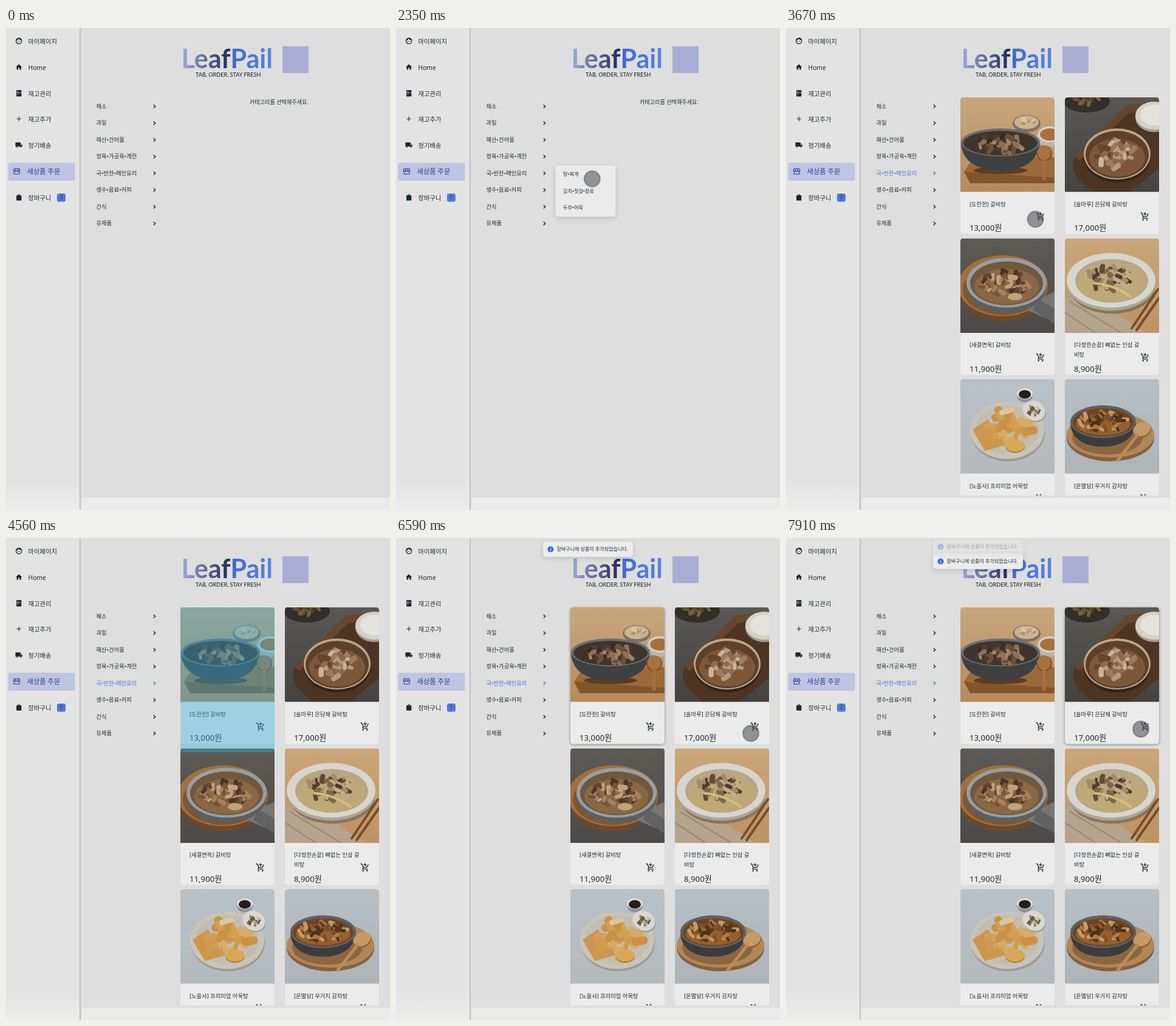
An HTML page for the animation above (8 s loop, 632 by 792 pixels).

```html
<!DOCTYPE html>
<html>
<head>
<meta charset="utf-8">
<title>LeafPail</title>
<style>
  html, body { margin: 0; width: 100%; height: 100%; overflow: hidden; background: #dedede; }
  svg { display: block; width: 100%; height: 100%; }
  text { font-family: "Noto Sans", "Noto Sans CJK KR", "Noto Sans CJK", sans-serif; font-weight: 500; fill: #222b30; white-space: pre; }
  .logo { font-family: Lato, sans-serif; }
  .soft { filter: drop-shadow(0 2px 4px rgba(0,0,0,.16)); }
  .lift { filter: drop-shadow(0 1px 2px rgba(0,0,0,.4)); }
</style>
</head>
<body>
<svg id="stage" viewBox="0 0 632 792"></svg>
<script>
const DARK = '#1c262b', BLUE = '#4d7bd8', NAVY = '#2c3c94';
const LOOP = 8000;

// Text centred vertically on y
const label = (s, x, y, size, extra = '') =>
  `<text x="${x}" y="${y + size * 0.36}" font-size="${size}" ${extra}>${s}</text>`;
const oval = (x, y, rx, ry, fill, extra = '') =>
  `<ellipse cx="${x}" cy="${y}" rx="${rx}" ry="${ry}" fill="${fill}" ${extra}/>`;
const box = (x, y, w, h, fill, r = 0, extra = '') =>
  `<rect x="${x}" y="${y}" width="${w}" height="${h}" rx="${r}" fill="${fill}" ${extra}/>`;
const shape = (d, fill, extra = '') => `<path d="${d}" fill="${fill}" ${extra}/>`;
const stroke = (d, color, w) =>
  `<path d="${d}" fill="none" stroke="${color}" stroke-width="${w}" stroke-linecap="round" stroke-linejoin="round"/>`;
const gradient = (id, a, b, attrs = 'x2="0" y2="1"') =>
  `<linearGradient id="${id}" ${attrs}><stop stop-color="${a}"/><stop offset="1" stop-color="${b}"/></linearGradient>`;

let seed = 7;
const rand = () => (seed = (seed * 16807) % 2147483647) / 2147483647;

// Chunks of food scattered inside an ellipse
function chunks(cx, cy, rx, ry, n, size, colors) {
  let out = '';
  for (let i = 0; i < n; i++) {
    const a = rand() * 6.283, d = Math.sqrt(rand()), s = size * (0.6 + rand() * 0.6);
    const x = cx + Math.cos(a) * d * rx, y = cy + Math.sin(a) * d * ry;
    out += box(-s, -s * 0.5, s * 2, s, colors[i % colors.length], s * 0.45,
      `transform="translate(${x.toFixed(1)} ${y.toFixed(1)}) rotate(${(rand() * 180 - 90).toFixed()})"`);
  }
  return out;
}

const MEAT = ['#3b2a20', '#6d4f3a', '#8f7159', '#543b2b', '#a08569'];
const GOLD = ['#d2a055', '#c99246', '#d9aa62', '#cf9a4e'];
const photos = [
  ['#c8a67d', '#b78a5c',
    shape('M6 122L22 98H155V141H16Z', '#9b6a3a') + shape('M6 122L155 132V141H16Z', '#83552c') +
    oval(109, 43, 23, 14, '#7d7062') + oval(109, 41, 20, 11, '#c9b492') +
    chunks(109, 41, 13, 6, 14, 4, ['#b68f60', '#dfc9a8', '#cbb088']) +
    oval(147, 64, 22, 17, '#b9b6b0') + oval(147, 61, 19, 13, '#d5d2cb') + oval(147, 61, 16, 10, '#a8713c') +
    oval(66, 120, 44, 6, '#5c3c22') +
    shape('M1 74C2 104 26 120 66 120S128 104 131 74Z', '#3d4144') +
    oval(66, 74, 65, 23, '#6b6d6d') + oval(66, 75, 61, 20, '#3d352e') +
    chunks(64, 78, 42, 14, 44, 7, MEAT) +
    oval(138, 92, 13, 13, '#7d4f28') + oval(138, 91, 11, 12, '#a87140') + stroke('M138 102V134', '#a5703f', 5)],
  ['#5a5854', '#444340',
    shape('M155 6L100 14L16 98Q8 116 22 134L44 155H108L155 116Z', '#4d3524') +
    shape('M155 6L100 14L16 98L24 104L104 26L155 18Z', '#67462d') +
    oval(36, 6, 38, 19, '#302f2c') + chunks(36, 5, 27, 12, 28, 5, ['#665530', '#45422a', '#806236', '#332d20']) +
    oval(147, 33, 31, 24, '#a09d96') + oval(147, 30, 31, 23, '#d5d1c9') + oval(148, 29, 24, 17, '#e4e2dc') +
    oval(86, 98, 55, 42, '#33241b') + oval(86, 93, 55, 42, '#bda585') +
    oval(86, 94, 52, 39, '#5b412d') + oval(86, 99, 46, 31, '#7d5838') +
    chunks(84, 94, 31, 22, 40, 8, ['#b39a82', '#8b6a50', '#c9b49b', '#634530', '#9c7b5e'])],
  ['#5d5a56', '#4c4a48',
    oval(70, 83, 75, 53, '#6f482b') + oval(70, 78, 74, 50, '#a0703f') +
    oval(70, 84, 66, 42, '#805630') +
    shape('M118 104L155 88V128L140 131L110 118Z', '#777675') +
    shape('M128 100L155 116V140L120 118Z', '#626162') +
    oval(76, 80, 66, 42, '#5a5f63') + oval(76, 73, 66, 41, '#999d9f') +
    oval(76, 74, 60, 36, '#6f5840') + oval(76, 79, 53, 29, '#8a6843') +
    chunks(74, 75, 40, 22, 46, 7, ['#4c3524', '#75543a', '#a3815d', '#bfa27b', '#62452f']) +
    oval(90, 96, 12, 6, '#bda57e')],
  ['#cba67a', '#bd9263',
    shape('M0 96L55 104L132 155H0Z', '#b5a48c') + stroke('M8 104L92 155M0 122L50 155', '#968670', 2) +
    oval(78, 82, 70, 42, '#8c7457') + oval(76, 74, 73, 45, '#aaa59b') + oval(76, 69, 73, 45, '#d8d5cd') +
    oval(77, 70, 60, 36, '#b8a684') + oval(77, 74, 55, 30, '#bda878') +
    chunks(74, 64, 38, 20, 40, 7, ['#5f4a37', '#7e664c', '#a18c6c', '#4f3c2b', '#c3ae87']) +
    stroke('M48 74Q80 76 108 96', '#d5bd7a', 4) +
    stroke('M153 84L110 148M155 98L118 151', '#7a4a26', 4)],
  ['#b9c1c7', '#b4b9bc',
    oval(78, 88, 61, 47, '#9c9c96') + oval(77, 84, 61, 47, '#c8c4b9') + oval(77, 83, 53, 40, '#c1bdb2') +
    shape('M20 83L45 66L75 108L40 118Z', '#cc964d') + chunks(80, 80, 38, 25, 26, 12, GOLD) +
    oval(90, 111, 16, 10, '#b07b38') + oval(90, 109, 16, 10, '#d8a75a') +
    box(64, 48, 24, 9, '#dcc69f', 3, 'transform="rotate(-18 76 52)"') +
    oval(106, 27, 13, 11, '#8e9294') + oval(106, 24, 13, 9, '#dedede') + oval(106, 25, 10, 7, '#281d1b') +
    oval(122, 54, 19, 16, '#97999a', 'transform="rotate(25 122 54)"') +
    oval(121, 52, 19, 16, '#dad7d1', 'transform="rotate(25 121 52)"') +
    chunks(121, 52, 11, 8, 24, 3, ['#5d5c40', '#96835b', '#c4b99c', '#6e5b45'])],
  ['#b7bfc5', '#aeb4b8',
    oval(75, 97, 72, 38, '#84613f') + oval(75, 92, 72, 37, '#b1875a') + oval(70, 96, 58, 28, '#8d663f') +
    shape('M9 72C10 98 32 111 62 111S115 98 117 72Z', '#3b3c3d') +
    oval(63, 70, 54, 27, '#606162') + oval(63, 71, 50, 23, '#70431f') + oval(63, 74, 45, 18, '#96602e') +
    chunks(63, 70, 40, 16, 50, 6, ['#5b351c', '#b07a42', '#7d4f2b', '#c39d66', '#45301f']) +
    oval(127, 84, 16, 12, '#8d663f', 'transform="rotate(-25 127 84)"') +
    oval(127, 82, 15, 11, '#c59a69', 'transform="rotate(-25 127 82)"') +
    stroke('M120 91L87 133', '#bb8c5a', 5)],
];

const goods = [
  [['[도란헌] 갈비탕'], '13,000원'],
  [['[솔마루] 은담채 갈비탕'], '17,000원'],
  [['[새결면옥] 갈비탕'], '11,900원'],
  [['[다정한손끝] 뼈없는 인삼 갈', '비탕'], '8,900원'],
  [['[노을사] 프리미엄 어묵탕'], '12,900원'],
  [['[온별당] 우거지 감자탕'], '9,900원'],
];

const CART = 'M11 9h2V6h3V4h-3V1h-2v3H8v2h3zM7 18a2 2 0 1 0 .01 0zM17 18a2 2 0 1 0 .01 0zM7.2 14.7l.9-1.7h7.45c.75 0 1.41-.41 1.75-1.03l3.86-7.01L19.42 4 15.55 11H8.53L4.27 2H1v2h2l3.6 7.59-1.35 2.45C4.5 15.4 5.5 17 7 17h12v-2H7.42z';

const card = ([lines, price], i) => {
  const [top, bottom, food] = photos[i];
  return `<g transform="translate(${i % 2 ? 459 : 287} ${114 + 231.5 * (i >> 1)})">
    ${box(0, 0, 155, 224.5, '#ebebeb', 5, `id="card${i}"`)}
    <g clip-path="url(#photo)">${gradient('bg' + i, top, bottom)}${box(0, 0, 155, 155.5, `url(#bg${i})`)}${food}</g>
    ${lines.map((s, n) => label(s, 15, 175.5 + 16 * n, 9.3)).join('')}
    ${label(price, 15, 214.5, 13.2)}
    <g transform="translate(124 188) scale(.66)">${shape(CART, DARK)}</g></g>`;
};

const icons = [
  '<circle cx="12" cy="12" r="9" fill="none" stroke="#1c262b" stroke-width="2.4"/>' +
    shape('M3 11Q9 10 11 5Q14 10 21 10L18 4L12 2L5 5Z', DARK) + oval(9, 14, 1.4, 1.4, DARK) + oval(15, 14, 1.4, 1.4, DARK),
  shape('M10 20v-6h4v6h5v-8h3L12 3 2 12h3v8z', DARK),
  box(4, 2, 16, 20, DARK, 2) + shape('M4 9.3h16v1.4H4zM7.5 5h2v3h-2zM7.5 12.5h2v4h-2z', '#e3e3e3'),
  shape('M19 13h-6v6h-2v-6H5v-2h6V5h2v6h6z', DARK),
  shape('M20 8h-3V4H3Q1 4 1 6v11h22v-5z', DARK) + shape('M17 9.5h2.5l2 2.5H17z', '#e3e3e3') +
    [6, 18].map(x => oval(x, 17, 3, 3, DARK) + oval(x, 17, 1.3, 1.3, '#e3e3e3')).join(''),
  stroke('M4 11V20H20V11M4 4H20L22 10Q20 13 17 11Q14.500 13 12 11Q9.500 13 7 11Q4 13 2 10ZM8.500 4V11M15.500 4V11', NAVY, 2),
  shape('M18 6h-2a4 4 0 0 0-8 0H6Q4 6 4 8v12q0 2 2 2h12q2 0 2-2V8q0-2-2-2zM12 4q2 0 2 2h-4q0-2 2-2z', DARK),
];
const pages = ['마이페이지', 'Home', '재고관리', '재고추가', '정기배송', '새상품 주문', '장바구니'];
const pageY = [21.5, 64.5, 107.5, 149.5, 192.5, 235.5, 278.5];
const page = (s, i) => {
  const on = i == 5;
  return `<g transform="translate(${on ? 11 : 15} ${pageY[i] - 6.5}) scale(${on ? 0.55 : 0.52})">${icons[i]}</g>` +
    label(s, on ? 34.5 : 36.5, pageY[i] + 0.5, on ? 11.3 : 10.3, on ? `style="fill:${NAVY}"` : '');
};

const groups = ['채소', '과일', '해산•건어물', '정육•가공육•계란', '국•반찬•메인요리', '생수•음료•커피', '간식', '유제품'];
const group = (s, i) => {
  const y = 128.5 + 27.5 * i;
  return `<g id="group${i}">${label(s, 148.5, y, 9.3)}<path d="M242.800 ${y - 2.5}l3 2.800-3 2.800" fill="none" stroke="${DARK}" stroke-width="1.400"/></g>`;
};

const toast = id => `<g id="${id}">${box(242, 6, 148, 25, '#ececec', 5, 'class="soft"')}
  ${oval(254.5, 18.5, 5, 5, '#3c6bd4')}${shape('M253.900 15.500h1.300v1.300h-1.300zM253.900 17.700h1.300v3.800h-1.300z', '#ececec')}
  ${label('장바구니에 상품이 추가되었습니다.', 264.5, 18, 8.05)}</g>`;

stage.innerHTML = `<defs>
  ${gradient('side', '#e3e3e3', '#ececec', 'gradientUnits="userSpaceOnUse" x1="0" y1="745" x2="0" y2="790"')}
  ${gradient('edge', '#b4b6b8', '#dedede', '')}
  ${gradient('word1', '#9ba6d4', '#1d2450', 'gradientUnits="userSpaceOnUse" x1="292" x2="371" y1="0" y2="0"')}
  ${gradient('word2', '#4168d2', '#5b86e0', 'gradientUnits="userSpaceOnUse" x1="371" x2="444" y1="0" y2="0"')}
  <clipPath id="photo"><path d="M0 155.500V5Q0 0 5 0H150Q155 0 155 5V155.500Z"/></clipPath>
  <clipPath id="list"><rect x="270" y="100" width="362" height="668"/></clipPath>
  <clipPath id="pill"><rect x="84" y="272" width="14" height="13.500"/></clipPath></defs>
  ${box(0, 0, 632, 792, '#dedede')}${box(121, 772, 511, 20, '#ebebeb')}
  ${box(0, 0, 121, 792, 'url(#side)')}${box(121, 0, 3, 792, 'url(#edge)')}
  ${box(3.5, 221.5, 110, 29.5, '#bfc4e2', 3)}
  ${pages.map(page).join('')}
  ${box(84, 272, 14, 13.5, BLUE, 3)}
  <g clip-path="url(#pill)"><g id="count">${[0, 1, 2].map(n =>
    label(n, 91, 278.5 + 14 * n, 8, 'text-anchor="middle" style="fill:#26366e"')).join('')}</g></g>
  <text class="logo" x="288.500" y="66" font-size="43" style="font-weight:700"><tspan style="fill:url(#word1)">Leaf</tspan><tspan style="fill:url(#word2)">Pail</tspan></text>
  ${label('TAB, ORDER, STAY FRESH', 312, 76.5, 9.1, 'class="logo"')}
  ${box(455, 30, 43, 44, '#a9add5')}
  ${groups.map(group).join('')}
  <g id="prompt">${label('카테고리를 선택해주세요.', 401, 121.5, 9.1)}</g>
  <g id="goods" clip-path="url(#list)">${goods.map(card).join('')}</g>
  <g id="menu">${box(262.5, 226, 99, 84, '#eaeaea', 4, 'class="soft"')}
    ${['탕•찌개', '김치•젓갈•장류', '두부•어묵'].map((s, i) => label(s, 275, 240.5 + 27.3 * i, 8.1)).join('')}</g>
  ${box(138, 226, 119.5, 25, '#2fa7d3', 0, 'id="tapRow"')}
  ${box(287, 114, 155, 238, '#2fa7d3', 0, 'id="tapCard"')}
  ${toast('toast2')}${toast('toast1')}
  <g id="cursor">${oval(0, 0, 13, 13, 'rgba(72,75,78,.56)', 'stroke="rgba(95,98,100,.6)" stroke-width="2"')}</g>`;

const $ = id => document.getElementById(id);
const set = (id, opacity, transform = '') => {
  const el = $(id);
  el.style.display = opacity > 0 ? '' : 'none';
  el.setAttribute('opacity', opacity);
  el.setAttribute('transform', transform);
};
const ramp = (t, start, length) => Math.min(1, Math.max(0, (t - start) / length));
const ease = p => p * p * (3 - 2 * p);
const between = (t, a, b) => t >= a && t < b;

// Value at t along [time, value] keys
function along(t, keys) {
  let v = keys[0][1];
  for (let i = 1; i < keys.length; i++) {
    const [a] = keys[i - 1], [b, to] = keys[i];
    v += (to - v) * ease(ramp(t, a, b - a));
  }
  return v;
}

function tint(id, p) {
  const color = `rgb(${[[34, 77], [43, 123], [48, 216]].map(([a, b]) => Math.round(a + (b - a) * p))})`;
  const [text, arrow] = $(id).children;
  text.style.fill = color;
  arrow.style.stroke = color;
}

function draw(t) {
  const loaded = t >= 2490;
  set('prompt', loaded ? 0 : 1);
  set('goods', loaded ? 1 : 0);
  tint('group0', along(t, [[1380, 0], [1520, 0.45], [1900, 0]]));
  tint('group4', ramp(t, 2490, 400));

  const shown = ease(ramp(t, 1370, 150)) - ramp(t, 2400, 260);
  const zoom = 0.8 + 0.2 * shown;
  set('menu', shown ** 1.4, `translate(262 226) scale(${zoom}) translate(-262 -226)`);

  set('tapRow', 0.2 * (ramp(t, 1380, 70) - ramp(t, 1590, 70)));
  const second = t > 6000;
  set('tapCard', between(t, 4480, 4690) || between(t, 7080, 7285) ? 0.4 : 0, second ? 'translate(172 0)' : '');
  $('card0').setAttribute('class', between(t, 4690, 7285) ? 'lift' : '');
  $('card1').setAttribute('class', t >= 7285 ? 'lift' : '');

  const in1 = ease(ramp(t, 4770, 250)), in2 = ease(ramp(t, 7300, 250)), out = ramp(t, 7760, 300);
  set('toast1', in1 * Math.max(0, 1 - 1.3 * out), `translate(0 ${-25 * (1 - in1) - 8 * out})`);
  set('toast2', in2, `translate(0 ${30 * (1 - out ** 1.6) - 25 * (1 - in2)})`);
  set('count', 1, `translate(0 ${-14 * (in1 + in2)})`);

  const x = along(t, [[1660, 200], [2000, 318], [2400, 323], [3050, 323], [3800, 418], [5630, 418], [6380, 584]]);
  const y = along(t, [[750, 211], [1100, 225], [1310, 240], [1660, 240], [2000, 246], [2400, 248], [3050, 248],
    [3800, 320], [5630, 320], [6380, 321], [7290, 321], [7500, 314]]);
  set('cursor', between(t, 750, 4350) || t >= 4700 ? 1 : 0, `translate(${x} ${y})`);
}

const start = performance.now();
function tick() {
  draw((performance.now() - start) % LOOP);
  requestAnimationFrame(tick);
}
tick();
</script>
</body>
</html>
```
